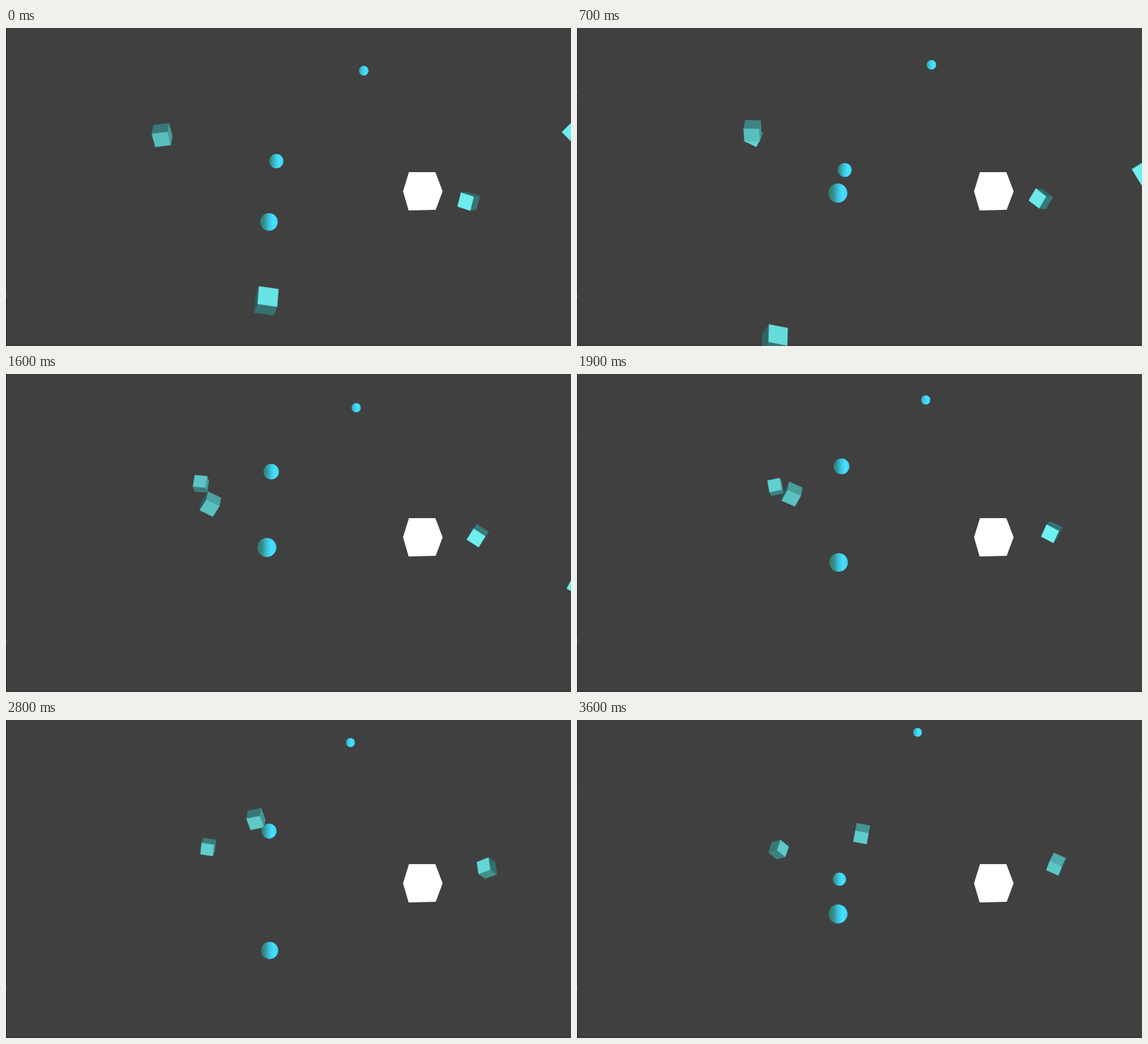
Recreate the animation shown at these times as an HTML page with a canvas. Size 856 by 481 pixels, loop 3.7 s.

```html
<!DOCTYPE html>
<html lang="en">
<head>
<meta charset="utf-8">
<title>Floating solids</title>
<style>
  html, body { margin: 0; width: 100%; height: 100%; overflow: hidden; background: #404040; }
  canvas { display: block; }
</style>
</head>
<body>
<canvas id="stage" width="856" height="481"></canvas>
<script>
const ctx = document.getElementById('stage').getContext('2d');
const { sin, cos, abs, max, min, sqrt, hypot, exp, PI } = Math;
const LOOP = 3700, STEP = 100;
const LIGHT = { x: 631, y: 247, z: 260 };
const DARK = [44, 92, 92], LIT = [113, 246, 246];

const smooth = k => (k = min(1, max(0, k)), k * k * (3 - 2 * k));
const bell = (t, mid, width) => exp(-(((t - mid) / width) ** 2));
// Height of a bouncing body: 0 at each hit, 1 at the top of each arc
const bounce = (t, hit, period) => abs(sin(PI * (t - hit) / period));

// Each cube: centre, edge, tilt of its front face, roll in degrees; t in seconds
const cubes = [
  t => ({
    x: 309 - t - 73 * max(0, 1 - t / 2.7) ** 2,
    y: 165 + 31 * smooth((t - 1.4) / 1.8),
    size: 18.8,
    tilt: [-.15 + .85 * smooth((t - 2.8) / .8), -.4 * cos(2.6 * (t - 1.6))],
    roll: 7 - 25 * sin(PI * (t - 1.6) / 1.2)
  }),
  t => ({
    x: 236.5 + 39 * t + 4.2 * t * t,
    y: 201 - 1.5 * t - 47 * bounce(t, 1.63, 2.37),
    size: 24 - t,
    tilt: [-.11, .56],
    roll: -5 + 8.6 * t * t + 12 * cos(5.24 * (t - .4))
  }),
  t => ({
    x: 394.5 - 133 * t - 3.5 * t * t,
    y: 412.8 + 97 * t - 20 * t * t,
    size: 30,
    tilt: [.17 + .2 * sin(1.4 * t), -.44],
    roll: 2 + 9 * cos(3 * (t - .35))
  }),
  t => ({
    x: 714.8 - 14.2 * cos(1.12 * (t - .2)),
    y: 240 + 22 * cos(.85 * t),
    size: 22 - .5 * t,
    tilt: [-.37 - .13 * cos(2.62 * (t - .45)), .06 + .16 * t * cos(3 * (t - 1.6))],
    roll: 16 + 27 * t - 45 * bell(t, 2.1, .7)
  }),
  t => ({
    x: 862 + t * (38.6 - 88 * t + 41.5 * t * t),
    y: 157.5 + 75 * t + 16 * t * t,
    size: 28,
    tilt: [0, .57 * bell(t, 1.1, .25)],
    roll: 45 + 28 * t * t
  })
];

// Balls grow a little as they rise towards the viewer
const balls = [
  t => {
    const up = bounce(t, .36, 1.17);
    return { x: 542 - 7.2 * t, y: 74.5 - 13.3 * t - 12 * up, r: 7.4 - .2 * t };
  },
  t => {
    const up = bounce(t, .42, 3.2);
    return { x: 409.5 - 6 * t + .75 * t * t, y: 243 - 104 * up, r: 10.1 + 1.8 * up };
  },
  t => {
    const up = bounce(t, 2.63, 2.96);
    return { x: 400.5 - 6 * up, y: 327 + 14 * t - 98 * up, r: 12.7 + 2 * up };
  }
];

function polygon(points, color, edge) {
  ctx.beginPath();
  points.forEach(([x, y]) => ctx.lineTo(x, y));
  ctx.closePath();
  ctx.fillStyle = ctx.strokeStyle = color;
  ctx.fill();
  if (edge) { ctx.lineWidth = edge; ctx.stroke(); }
}

// A light at the viewer plus a point light in front of the white solid
function shade(n, x, y) {
  const l = [LIGHT.x - x, LIGHT.y - y, LIGHT.z];
  const point = max(0, (n[0] * l[0] + n[1] * l[1] + n[2] * l[2]) / hypot(...l));
  const level = min(1, .65 * n[2] * n[2] + .42 * point);
  return `rgb(${DARK.map((v, i) => Math.round(v + (LIT[i] - v) * level))})`;
}

function drawCube({ x, y, size, tilt: [nx, ny], roll }) {
  const nz = sqrt(1 - nx * nx - ny * ny);
  const axis = deg => {
    const a = deg * PI / 180, cx = cos(a), cy = sin(a);
    const d = nx * cx + ny * cy, f = d / (1 + nz);
    return [cx - nx * f, cy - ny * f, -d];
  };
  const axes = [axis(roll), axis(roll + 90), [nx, ny, nz]];
  axes.forEach((a, i) => {
    if (abs(a[2]) < .01) return;
    const n = a.map(v => v * Math.sign(a[2]));
    const u = axes[(i + 1) % 3], v = axes[(i + 2) % 3];
    const corner = (p, q) => [0, 1].map(c =>
      [x, y][c] + size / 2 * (n[c] + p * u[c] + q * v[c]));
    polygon([corner(-1, -1), corner(1, -1), corner(1, 1), corner(-1, 1)], shade(n, x, y), .5);
  });
}

function drawBall({ x, y, r }) {
  const g = ctx.createLinearGradient(x - 14, y, x + r, y);
  ['#2f7a62', '#348f8c', '#3cc0e0', '#45e2ff', '#40d0f6']
    .forEach((color, i) => g.addColorStop(i / 4, color));
  ctx.fillStyle = g;
  ctx.beginPath();
  ctx.arc(x, y, r, 0, 2 * PI);
  ctx.fill();
}

function rect(color, ...box) {
  ctx.fillStyle = color;
  ctx.fillRect(...box);
}

function backdrop() {
  rect('#404040', 0, 0, 856, 481);
  rect('#383838', 0, 479, 856, 2);
  rect('#262626', 0, 0, 1, 481);
  for (const x of [0, 855]) {
    for (const y of [96, 111]) rect('#525252', x, y, 1, 2);
  }
  for (const y of [401, 405]) rect('#8a5238', 0, y, 1, 2);
}

function draw(t) {
  backdrop();
  polygon([[610.5, 218], [650.5, 218], [661.5, 247], [651, 275], [610, 276], [601.5, 247]], '#fff');
  cubes.forEach(pose => drawCube(pose(t)));
  balls.forEach(pose => drawBall(pose(t)));
}

const start = performance.now();
function tick() {
  const ms = (performance.now() - start) % LOOP;
  draw(Math.floor(ms / STEP) * STEP / 1000);
  requestAnimationFrame(tick);
}
tick();
</script>
</body>
</html>
```
